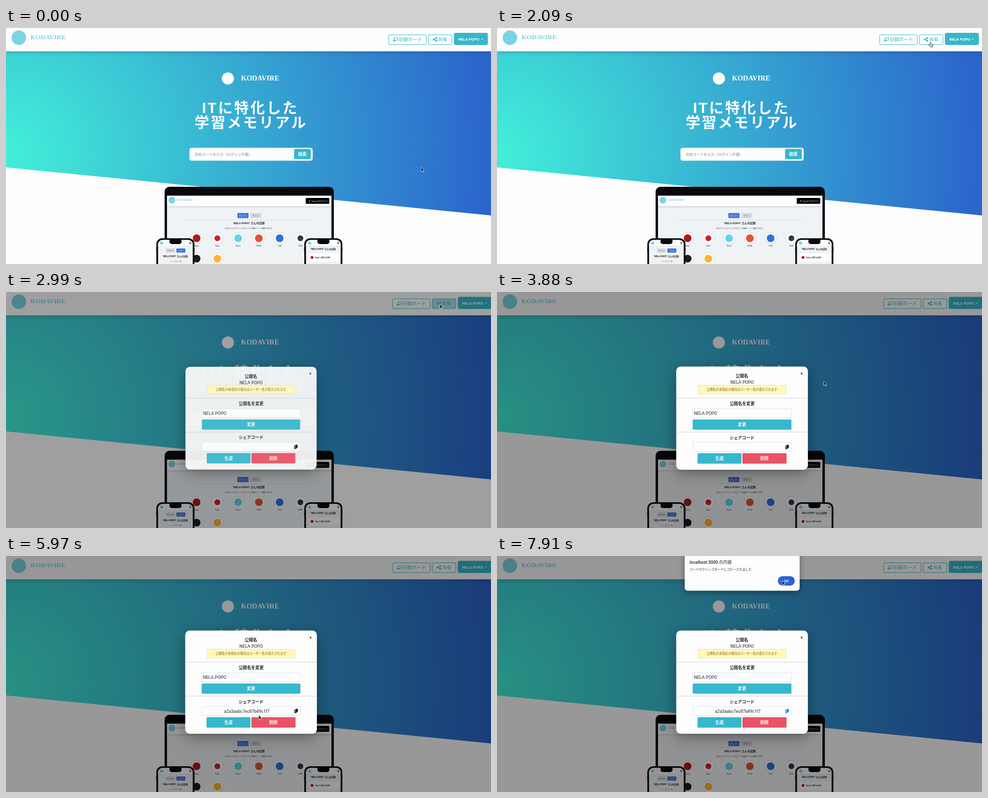
Write an HTML page with a canvas that moves like this. It is 1000 px wide and 486 px high and loops after 8000 ms.

```html
<!DOCTYPE html>
<html lang="ja">
<head>
<meta charset="utf-8">
<style>
html, body { margin: 0; width: 100%; height: 100%; overflow: hidden; background: #fdfdfd; }
canvas { display: block; width: 100vw; height: 100vh; }
</style>
</head>
<body>
<canvas id="stage" width="1000" height="486"></canvas>
<script>
const c = document.getElementById('stage').getContext('2d');
const LOOP = 8000, STEP = 149.2;
const TEAL = '#36b7cc', INK = '#22262a', WHITE = '#fdfdfd';
const USER = 'NELA POPO', BRAND = 'KODAVIRE';
const SANS = 'Roboto, "Noto Sans CJK JP", sans-serif';
const SERIF = '"Liberation Serif", serif';

// Times of the story
const OPEN = 2745, MADE = 4760, COPIED = 7240;
const PATH = [
  [0, 856, 287], [1200, 856, 287], [1900, 893.5, 29.5], [2550, 893.5, 29.5],
  [2750, 894.5, 25.5], [3400, 894.5, 25.5], [4350, 458.5, 338], [5500, 458.5, 338],
  [6500, 597, 315], [7250, 597, 315], [7750, 588, 51], [LOOP, 588, 51]
];

const clamp = v => Math.max(0, Math.min(1, v));

function box(x, y, x2, y2, r, fill, line) {
  c.beginPath();
  c.roundRect(x, y, x2 - x, y2 - y, r);
  if (fill) { c.fillStyle = fill; c.fill(); }
  if (line) { c.strokeStyle = line; c.lineWidth = 1; c.stroke(); }
}

function dot(x, y, r, fill, line) {
  c.beginPath();
  c.arc(x, y, r, 0, 7);
  c.fillStyle = fill;
  c.fill();
  if (line) { c.strokeStyle = line; c.lineWidth = .7; c.stroke(); }
}

function poly(points, fill, line) {
  c.beginPath();
  points.forEach(([x, y]) => c.lineTo(x, y));
  c.closePath();
  c.fillStyle = fill;
  c.fill();
  if (line) { c.strokeStyle = line; c.lineWidth = .8; c.stroke(); }
}

// y is the vertical middle of the letters
function text(s, x, y, size, color, { align = 'center', weight = 400, gap = 0, font = SANS } = {}) {
  c.font = `${weight} ${size}px ${font}`;
  c.textAlign = align;
  c.letterSpacing = gap + 'px';
  c.fillStyle = color;
  c.fillText(s, x, y + size * .37);
}
const bold = (s, x, y, size, color, align) => text(s, x, y, size, color, { align, weight: 700 });
const left = (s, x, y, size, color, weight) => text(s, x, y, size, color, { align: 'left', weight });

function shaded(color, blur, dy, draw) {
  c.save();
  c.shadowColor = color;
  c.shadowBlur = blur;
  c.shadowOffsetY = dy;
  draw();
  c.restore();
}

function logo(x, y, r, dx, size, color) {
  dot(x, y, r, color);
  text(BRAND, x + dx, y - r * .1, size, color, { align: 'left', weight: 700, font: SERIF });
}

function header(shift, pressed) {
  shaded('rgba(40,50,70,.3)', 9, 2, () => box(0, -9, 1000, 48, 0, WHITE));
  logo(26.5, 20, 15, 24, 13.5, '#79d4e4');
  c.save();
  c.translate(shift, 0);
  box(789, 14, 866.5, 34, 2, null, TEAL);
  box(871, 14, 919.5, 34, 2, pressed ? '#a9dde6' : null, TEAL);
  box(923.5, 10, 993.5, 35, 4, TEAL);
  left('記録ボード', 810, 23.5, 9.5, TEAL, 500);
  left('共有', 891, 23.5, 9.5, TEAL, 500);
  left(USER, 932.5, 23, 8, '#fff', 700);
  poly([[979.3, 22], [983.3, 22], [981.3, 24.3]], '#fff');
  // board with a person
  c.strokeStyle = TEAL;
  c.lineWidth = 1.2;
  c.beginPath();
  c.moveTo(801, 20); c.lineTo(807, 20); c.lineTo(807, 25.5); c.lineTo(803.5, 25.5);
  c.stroke();
  dot(800.5, 22.5, 1.4, TEAL);
  box(798, 24.7, 803, 27.5, 1.3, TEAL);
  // three joined dots
  c.beginPath();
  c.moveTo(887.2, 20.8); c.lineTo(882, 23.5); c.lineTo(887.2, 26.2);
  c.stroke();
  [[887.2, 20.8], [882, 23.5], [887.2, 26.2]].forEach(([x, y]) => dot(x, y, 1.9, TEAL));
  c.restore();
}

function hero() {
  const g = c.createRadialGradient(0, 260, 0, 0, 260, 1030);
  g.addColorStop(0, '#42f0d9');
  g.addColorStop(1, '#2a61cb');
  poly([[0, 48], [1000, 48], [1000, 386], [0, 287]], g);
  logo(457.5, 104, 12.5, 27, 14.7, '#fff');
  const title = { align: 'left', weight: 700, gap: 3.2 };
  text('ITに特化した', 404, 164, 30, '#fff', title);
  text('学習メモリアル', 389, 194, 30, '#fff', title);
  box(378.5, 247, 632, 273, 4, WHITE, '#d5e3ea');
  left('共有コードを入力（ログイン不要）', 389, 260, 7.4, '#85888c');
  box(594, 249, 628.5, 270, 2.5, TEAL);
  bold('検索', 611, 259.5, 8.7, '#fff');
}

function tabs(x, y, w, h, size, names, active) {
  names.forEach((name, i) => {
    const on = i === active, x0 = x + i * w * 1.15;
    box(x0, y, x0 + w, y + h, 1.5, on ? '#4272e0' : '#d9dbde');
    text(name, x0 + w / 2, y + h / 2, size, on ? '#fff' : '#555');
  });
}

function laptop() {
  box(327, 327, 676, 510, 10, '#08090b');
  box(332, 345.5, 671, 500, 0, '#eff3f6');
  shaded('rgba(40,50,70,.25)', 4, 1, () => box(332, 345.5, 671, 367, 0, WHITE));
  logo(342, 354.5, 7, 10, 6.3, '#79d4e4');
  box(618, 350, 666.5, 362, 1.5, '#000');
  dot(626, 356, 1.5, '#e0524a');
  left('Quvoloでログイン', 630, 356, 4.3, '#fff');
  tabs(477, 381, 23, 10.5, 4.4, ['カテゴリ', 'グラフ'], 0);
  box(369, 395, 634, 395.6, 0, '#c9ced2');
  bold(`"${USER}" さんの記録`, 500.5, 401.5, 5.8, INK);
  text('※ 各カテゴリをクリックすることで詳細ページへ遷移できます', 500, 413, 3.5, '#333');
  const skills = [
    ['Ruby', '#ab1a1c', 8], ['Rails', '#cf1f26', 6], ['React', '#61d3ee', 8],
    ['HTML', '#e35430', 8], ['CSS', '#2b74d6', 8], ['QZW', '#31394a', 6],
    ['', '#1c1c1f', 8], ['', '#fbb433', 8]
  ];
  skills.forEach(([name, color, r], i) => {
    const x = 393 + (i % 6) * 42.8, y = i < 6 ? 433 : 475;
    dot(x, y, 12, WHITE, '#c3c9ce');
    dot(x, y, r, color);
    text(name, x, 449, 4, INK);
  });
}

function phone(x) {
  box(x - .5, 452, x + 79, 460, 0, '#555');
  box(x, 433, x + 78.5, 520, 12, '#08090b');
  box(x + 3.5, 436.5, x + 75, 520, 9, '#eff3f6');
  box(x + 3.5, 436.5, x + 75, 449, [9, 9, 0, 0], WHITE);
  box(x + 3.5, 449, x + 75, 450, 0, '#dde2e6');
  box(x + 27, 434, x + 52, 445, 5, '#08090b');
  logo(x + 11, 443, 3.2, 4.2, 2.7, '#79d4e4');
  for (let i = 0; i < 3; i++) box(x + 68, 441 + i * 1.5, x + 72, 441.8 + i * 1.5, 0, '#333');
}

function phones() {
  const name = `"${USER}" さんの記録`;
  phone(310);
  tabs(330, 454, 18.5, 8.5, 3.6, ['カテゴリ', 'グラフ'], 1);
  bold(name, 349, 470, 4.6, INK);
  left('▭▭', 337, 481, 4, '#e0555f');
  left('グラフ一覧', 346, 481, 3.2, '#555');
  phone(615);
  bold(name, 654, 455.5, 4.6, INK);
  box(624, 464, 687, 481, 1.5, WHITE);
  dot(631, 472.5, 3, '#b51f22');
  left('"Ruby"に関する記録', 637, 472.5, 3.5, INK, 700);
}

function copyIcon(color) {
  box(594.5, 316.5, 599.5, 323.5, 1, color);
  box(596.2, 314.3, 602.3, 321.9, 1, WHITE);
  box(596.8, 314.8, 601.8, 321.4, 1, color);
}

function modal(show, code, genHover, copyHover) {
  c.save();
  c.globalAlpha = show;
  const k = .94 + .06 * show;
  c.translate(505.3, 260);
  c.scale(k, k);
  c.translate(-505.3, -260);
  shaded('rgba(0,0,0,.35)', 30, 8, () => box(369.5, 153.5, 641, 366, 9, WHITE));
  bold('公開名', 505, 173, 8.7, INK);
  text(USER, 505.5, 186, 9, INK);
  box(414.5, 192, 596.5, 210, 1.5, '#fef8bb');
  c.setLineDash([1.5, 1]);
  box(414.5, 192, 596.5, 210, 1.5, null, '#e3d98a');
  c.setLineDash([]);
  text('公開名が未設定の場合はユーザー名が表示されます', 505, 200.5, 6.35, '#8f5418');
  bold('x', 628, 167, 8, INK);
  box(369.5, 218, 641, 219, 0, '#cfd2d5');
  bold('公開名を変更', 505.5, 230, 8.6, INK);
  box(403.5, 240.5, 607, 258.5, 1.5, WHITE, '#dde6ea');
  left(USER, 406, 249.5, 9, INK);
  box(403.5, 262.5, 607, 283.5, 2, TEAL);
  bold('変更', 505.3, 273, 8.7, '#fff');
  box(369.5, 288, 641, 289, 0, '#cfd2d5');
  bold('シェアコード', 505.3, 299.5, 8.5, INK);
  box(403.5, 310, 607, 328, 1.5, WHITE, '#dde6ea');
  text(code, 496.5, 319.5, 8.7, INK);
  copyIcon(copyHover ? '#2f8fcb' : '#15181b');
  box(413.5, 332, 504, 353.5, 2, genHover ? '#40d9de' : TEAL);
  bold('生成', 458.7, 343, 8.7, '#fff');
  box(506, 332, 597, 353.5, 2, '#e95265');
  bold('削除', 551.5, 343, 8.7, '#fff');
  c.restore();
}

function alertBox() {
  shaded('rgba(0,0,0,.4)', 14, 3, () => box(387, -10, 624, 71.5, 6, WHITE));
  left('localhost:3000 の内容', 397, 12.5, 8.8, INK, 500);
  left('コードがクリップボードにコピーされました', 397, 28, 6.4, '#333');
  box(579, 41.5, 614, 61, 9.7, '#2c63d2');
  text('OK', 596.5, 51.5, 7, '#fff', { weight: 500 });
}

function pointAt(t) {
  const i = Math.max(1, PATH.findIndex(p => p[0] > t));
  const [t0, x0, y0] = PATH[i - 1], [t1, x1, y1] = PATH[i];
  const u = (t - t0) / (t1 - t0), e = u * u * (3 - 2 * u);
  return [x0 + (x1 - x0) * e, y0 + (y1 - y0) * e];
}

function cursor(x, y, hand) {
  c.save();
  c.translate(x, y);
  c.lineJoin = 'round';
  if (hand) {
    poly([[-.8, .5], [0, 0], [.8, .5], [1, 3.4], [4.4, 4.2], [5.3, 5.3], [4.6, 9.6],
      [-.4, 9.6], [-3.2, 6], [-2.6, 5], [-.8, 6]], '#fff', '#222');
    c.beginPath();
    for (const dx of [1, 2.4, 3.8]) { c.moveTo(dx, 5.6); c.lineTo(dx, 8); }
    c.lineWidth = .5;
    c.stroke();
  } else {
    poly([[0, 0], [0, 8.6], [2, 6.9], [3.4, 9.9], [4.9, 9.2], [3.5, 6.3], [6.2, 6.2]], '#000', '#fff');
  }
  c.restore();
}

function draw(t) {
  const [x, y] = pointAt(t);
  const over = (x0, y0, x1, y1) => x >= x0 && x <= x1 && y >= y0 && y <= y1;
  const opened = t >= OPEN, copied = t >= COPIED;
  const onShare = !opened && over(871, 13, 919, 34);
  const onGen = opened && over(413, 332, 504, 354);
  const onDelete = opened && over(506, 332, 597, 354);
  const onCopy = opened && over(594, 313, 603, 325);
  const show = clamp((t - OPEN) / 257);

  c.fillStyle = WHITE;
  c.fillRect(0, 0, 1000, 486);
  hero();
  header(opened ? 8 : 0, opened && t < 3500);
  laptop();
  phones();
  if (opened) {
    c.fillStyle = `rgba(0,0,0,${.4 * show})`;
    c.fillRect(0, 0, 1000, 486);
    modal(show, t >= MADE ? 'a2a3aabc7ec87b49c1f7' : '', onGen, onCopy || copied);
  }
  if (copied) alertBox();
  cursor(x, y, onShare || onGen || onDelete || (onCopy && !copied));
}

function tick(now) {
  draw(Math.floor((now % LOOP + 8) / STEP) * STEP);
  requestAnimationFrame(tick);
}
requestAnimationFrame(tick);
</script>
</body>
</html>
```
